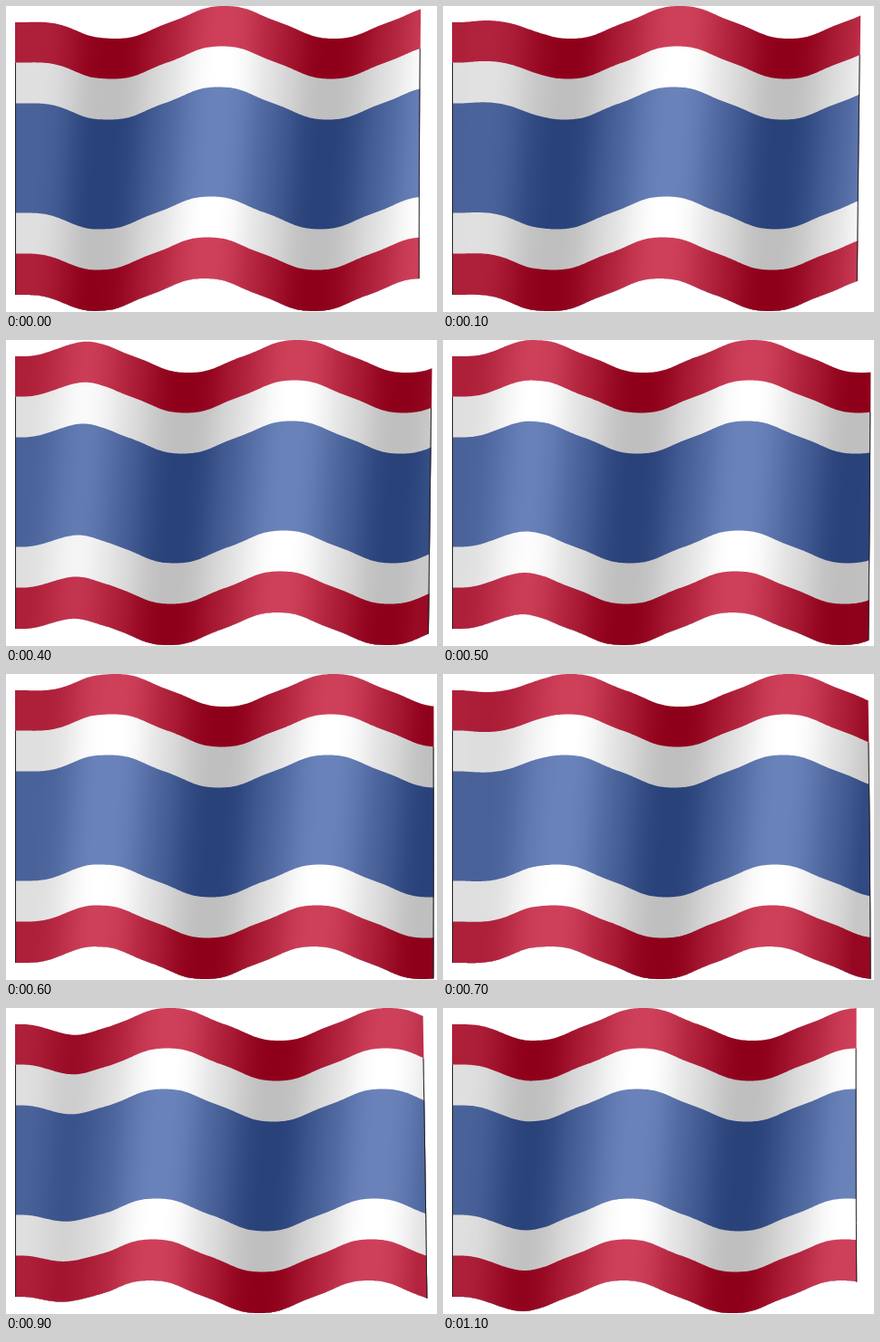
These frames come from a looping animation (475x338 px, 1200 ms). An HTML page with a canvas:

```html
<!DOCTYPE html>
<html lang="en">
<head>
<meta charset="utf-8">
<title>Waving flag</title>
<style>
  html, body { margin: 0; width: 100%; height: 100%; overflow: hidden; background: #fff; }
  canvas { display: block; }
</style>
</head>
<body>
<canvas id="flag" width="475" height="338"></canvas>
<script>
const ctx = document.getElementById('flag').getContext('2d');
const W = 475, H = 338;
const LEFT = 10, AMP = 18, WAVELENGTH = 240.5, SLANT = 22 / 301;
const STEP_MS = 100, STEPS = 12;

const RED = [174, 32, 58], WHITE = [223, 223, 223], BLUE = [74, 98, 154];
const BANDS = [
  { top: 0, color: RED },
  { top: 44.5, color: WHITE },
  { top: 89.5, color: BLUE },
  { top: 210.5, color: WHITE },
  { top: 255.5, color: RED }
];
const BOTTOM = 301;

// The cloth is pinned at the pole and swings freely further out.
function freedom(x) {
  const u = Math.min(1, Math.max(0, (x - 18) / 80));
  return u * u * (3 - 2 * u);
}

// 1 on a crest, -1 in a trough: rounded tops joined by straight slopes.
function wave(u, step) {
  const a = 2 * Math.PI * ((u - 241) / WAVELENGTH - step / STEPS);
  return (Math.cos(a) + 0.033 * Math.cos(3 * a) - 0.025 * Math.cos(5 * a)) / 1.008;
}

// Height of the cloth, from -1 to 1; the wave is stretched near the pole.
function lift(x, offset, step) {
  const lead = 0.25 * Math.max(0, 115 - x);
  return freedom(x) * wave(x + lead + SLANT * offset, step);
}

function drop(x, offset, step) {
  return AMP * (1 - lift(x, offset, step));
}

// The free edge moves out as it sinks.
function edgePoint(offset, step) {
  let x = 464;
  for (let i = 0; i < 8; i++) x = 455.6 + drop(x, offset, step) * 16 / 36;
  return [x, offset + drop(x, offset, step)];
}

function shading(color, midOffset, step) {
  const d = W / (1 + SLANT * SLANT);
  const g = ctx.createLinearGradient(0, 0, d, d * SLANT);
  for (let u = 0; u <= W; u += 5) {
    const x = u - SLANT * (midOffset + AMP);
    const light = 32 * lift(x, midOffset, step);
    const rgb = color.map(c => Math.round(Math.max(0, Math.min(255, c + light))));
    g.addColorStop(u / W, `rgb(${rgb})`);
  }
  return g;
}

function edgePath(from, step) {
  const points = [];
  for (let i = 0; i <= 12; i++) {
    points.push(edgePoint(from + (BOTTOM - from) * i / 12, step));
  }
  return points;
}

// Each band reaches down to the hem; the next one covers the rest.
function fillFrom(band, next, step) {
  const edge = edgePath(band.top, step);
  const topEnd = edge[0][0], bottomEnd = edge[edge.length - 1][0];
  ctx.beginPath();
  for (let x = LEFT; x < topEnd; x += 2) ctx.lineTo(x, band.top + drop(x, band.top, step));
  for (const p of edge) ctx.lineTo(...p);
  for (let x = bottomEnd; x > LEFT; x -= 2) ctx.lineTo(x, BOTTOM + drop(x, BOTTOM, step));
  ctx.lineTo(LEFT, BOTTOM + AMP);
  ctx.closePath();
  ctx.fillStyle = shading(band.color, (band.top + next) / 2, step);
  ctx.fill();
}

function strokeEdges(step) {
  const from = BANDS[1].top;
  ctx.strokeStyle = '#222';
  ctx.lineWidth = 1;
  ctx.beginPath();
  ctx.moveTo(LEFT + 0.5, from + AMP);
  ctx.lineTo(LEFT + 0.5, BOTTOM + AMP);
  edgePath(from, step).forEach(([x, y], i) => {
    if (i) ctx.lineTo(x - 0.5, y);
    else ctx.moveTo(x - 0.5, y);
  });
  ctx.stroke();
}

function draw(step) {
  ctx.fillStyle = '#fff';
  ctx.fillRect(0, 0, W, H);
  BANDS.forEach((band, i) => {
    const next = i + 1 < BANDS.length ? BANDS[i + 1].top : BOTTOM;
    fillFrom(band, next, step);
  });
  strokeEdges(step);
}

const start = performance.now();
let shown = -1;
function tick() {
  const step = Math.floor((performance.now() - start) / STEP_MS) % STEPS;
  if (step !== shown) draw(shown = step);
  requestAnimationFrame(tick);
}
tick();
</script>
</body>
</html>
```
